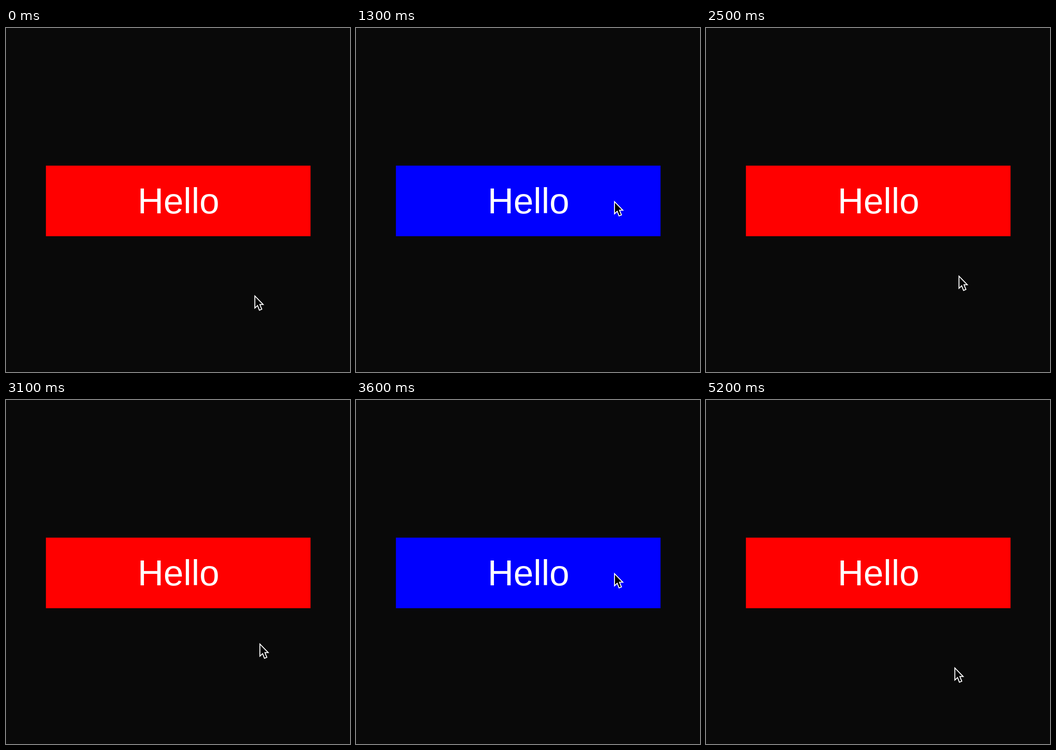
Write an HTML page that moves like this. It is 748x748 px and loops after 5700 ms.

```html
<!DOCTYPE html>
<html lang="en">
<head>
<meta charset="utf-8">
<title>Hover button</title>
<style>
  html, body { margin: 0; width: 100%; height: 100%; overflow: hidden; background: #090909; }
  svg { display: block; width: 100%; height: 100%; }
  text { font: 78px "Liberation Sans", Arial, sans-serif; fill: #fff; text-anchor: middle; }
</style>
</head>
<body>
<svg viewBox="0 0 748 748">
  <rect id="button" x="86.8" y="299.3" width="575.4" height="153.4"/>
  <text x="375" y="402.5">Hello</text>
  <path id="pointer" d="M1.1 2.6V29L7 23.4 11 33.6 16.2 31.5 12 21.3H19.2Z"
        fill="#000" stroke="#fff" stroke-width="2"/>
</svg>
<script>
const LOOP = 5700, STEP = 100;
const HOVER_LAG = 70, BUTTON_BOTTOM = 453;
const LOW = 580, MID = 556, HIGH = 375;
const button = document.getElementById("button");
const pointer = document.getElementById("pointer");

// Vertical pointer moves, with a rest after each one.
const moves = [
  { start: 440, end: 1120, from: LOW, to: HIGH },
  { start: 2070, end: 2645, from: HIGH, to: MID },
  { start: 2890, end: 3605, from: MID, to: HIGH },
  { start: 4510, end: 5240, from: HIGH, to: LOW }
];

const ease = u => u * u * u * (10 - 15 * u + 6 * u * u);

function pointerY(t) {
  const { start, end, from, to } = moves.filter(m => m.start <= t).pop() || moves[0];
  const u = Math.min(1, Math.max(0, (t - start) / (end - start)));
  return from + (to - from) * ease(u);
}

// The hand swings along a shallow arc.
const pointerX = y => 561.8 - 0.000658 * (y - 398) ** 2;

function draw(time) {
  const t = Math.floor((time % LOOP) / STEP) * STEP;
  const y = Math.round(pointerY(t));
  const hovered = pointerY(t - HOVER_LAG) < BUTTON_BOTTOM;
  pointer.setAttribute("transform", `translate(${Math.round(pointerX(y))} ${y})`);
  button.setAttribute("fill", hovered ? "#00f" : "#f00");
}

const begin = performance.now();
function tick() {
  draw(performance.now() - begin);
  requestAnimationFrame(tick);
}
tick();
</script>
</body>
</html>
```
